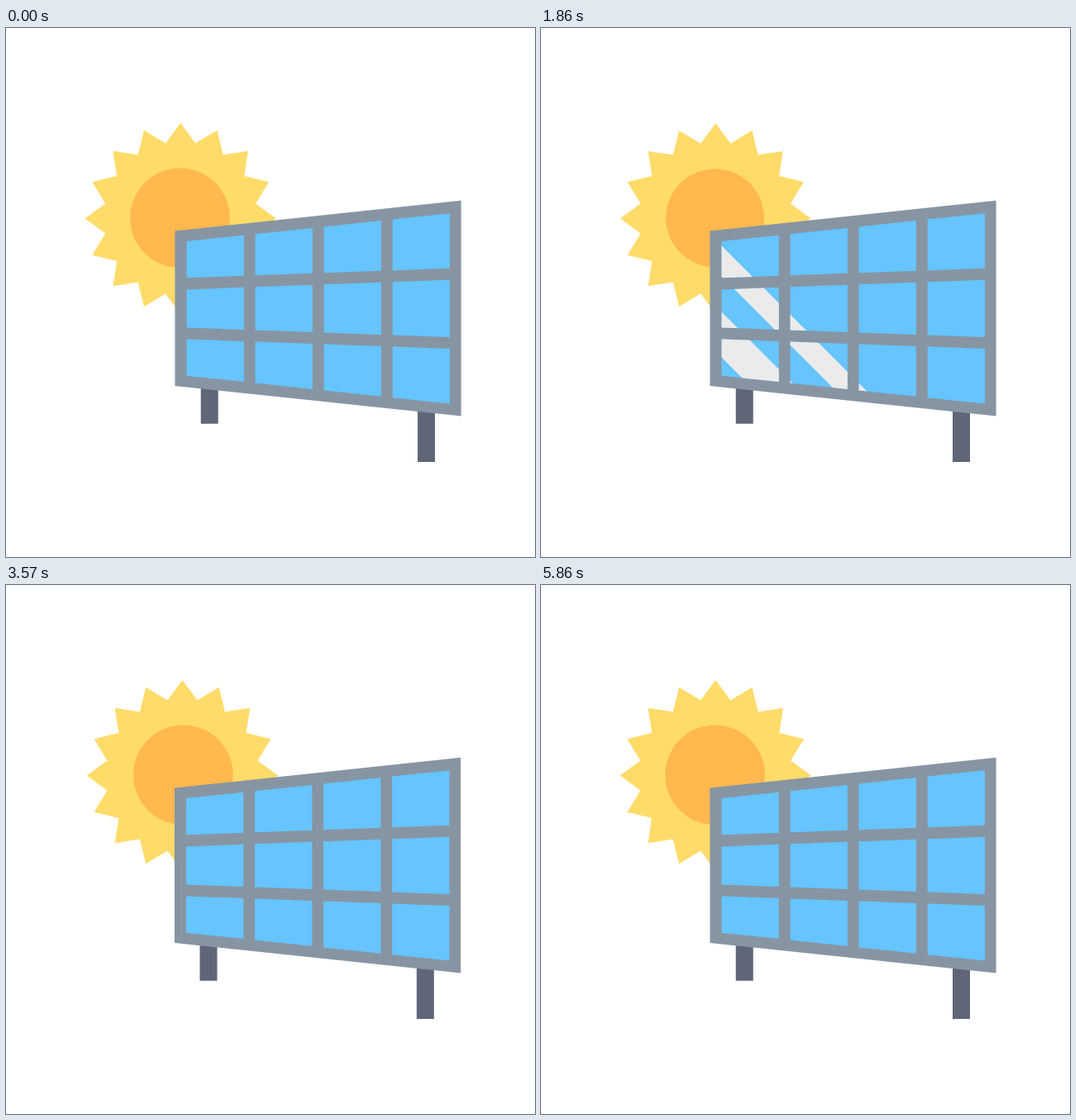
Write an HTML page that moves like this. It is 640x640 px and loops after 6 s.

```html
<!DOCTYPE html>
<html lang="en">
<head>
<meta charset="utf-8">
<title>Solar panel</title>
<style>
  html, body { margin: 0; width: 100%; height: 100%; overflow: hidden; background: #fff; }
  svg { display: block; width: 100%; height: 100%; }
</style>
</head>
<body>
<svg viewBox="0 0 640 640">
  <defs>
    <clipPath id="cellClip"><path id="window"/></clipPath>
  </defs>
  <path id="rays" fill="#ffdb69"/>
  <circle id="core" r="60.3" fill="#ffb84d"/>
  <path id="legs" fill="#5f6677" d="M235.7 400h21V478.7h-21ZM498 400h21V525h-21Z"/>
  <g id="panel">
    <path fill="#8795a3" d="M204.4 245.6L550.6 208.8V469.4L204.4 433Z"/>
    <path id="cells" fill="#66c4ff"/>
  </g>
  <g clip-path="url(#cellClip)">
    <path id="glare" fill="#ebebeb" d="M0 0h55l640 640h-55ZM98 0h37l640 640h-37Z"/>
  </g>
</svg>
<script>
const LOOP = 6000, STEPS = 84;
const $ = id => document.getElementById(id);

// Sixteen-pointed star around the origin
$('rays').setAttribute('d', 'M' + Array.from({ length: 32 }, (_, i) => {
  const r = i % 2 ? 92.7 : 115.6, a = i * Math.PI / 16;
  return `${r * Math.sin(a)} ${-r * Math.cos(a)}`;
}).join('L') + 'Z');

// Cell edges fan out symmetrically from the middle line, left to right
const LEFT = 218.5, CELL = 69.3, PITCH = 83.05, SPAN = 318.4, MIDDLE = 339.4;
const edge = (near, far) => x => near + (far - near) * (x - LEFT) / SPAN;
const outer = edge(81.3, 115.2), inner = edge(37.1, 48.7), mid = edge(23, 34.7);
const flip = f => x => -f(x);
let cellPath = '';
for (const [top, bottom] of [[flip(outer), flip(inner)], [flip(mid), mid], [inner, outer]]) {
  for (let col = 0; col < 4; col++) {
    const x = LEFT + col * PITCH, x2 = x + CELL;
    cellPath += `M${x} ${MIDDLE + top(x)}L${x2} ${MIDDLE + top(x2)}` +
                `V${MIDDLE + bottom(x2)}L${x} ${MIDDLE + bottom(x)}Z`;
  }
}
$('cells').setAttribute('d', cellPath);
$('window').setAttribute('d', cellPath);

// Sine ease from 0 to 1 over a span of time
const ease = (t, start, length) =>
  (1 - Math.cos(Math.PI * Math.min(1, Math.max(0, (t - start) / length)))) / 2;

// Eased move to a first offset, then a second, then back; each beat is longer by growth
function swing(t, start, beat, growth, first, second) {
  const beat2 = beat * growth, beat3 = beat2 * growth;
  return first * ease(t, start, beat) +
         (second - first) * ease(t, start + beat, beat2) -
         second * ease(t, start + beat + beat2, beat3);
}

const pulse = (t, beat, size) => 1 + swing(t, 0, beat, 1, size, -size);
const shake = (t, start, beat, growth, size) => swing(t, start, beat, growth, size, -size);
const flare = t => swing(t, 3700, 593, 1.2, -.127, .245);
const sweep = t => 320 - 660 * ease(t, t < 3000 ? 472 : 3456, 2060);

const place = (id, x, y, scale, turn = 0) =>
  $(id).setAttribute('transform', `translate(${x} ${y}) rotate(${turn}) scale(${scale})`);

// Scales about the middle of the panel
const placeAtPanel = (id, scale, dx) =>
  place(id, 377.7 * (1 - scale) + dx, 340 * (1 - scale), scale);

function draw(t) {
  const panelScale = pulse(t, 610, .1), panelX = shake(t, 2000, 482, 1.12, 26);
  placeAtPanel('panel', panelScale, panelX);
  placeAtPanel('window', panelScale, panelX);
  placeAtPanel('legs', panelScale, shake(t, 2000, 482, 1.14, 26));
  place('rays', 211.2 + shake(t, 2040, 525, 1.04, -26), 230.5,
        pulse(t, 640, .1) + flare(t), 360 * ease(t, 3758, 2102));
  place('core', 210.5 + shake(t, 2050, 525, 1.06, -26), 229.8,
        pulse(t, 660, .185) + flare(t));
  place('glare', sweep(t), 0, 1);
}

const start = performance.now();
function tick() {
  const t = (performance.now() - start) % LOOP;
  const step = Math.floor((t + 5) * STEPS / LOOP) % STEPS;
  draw(step * LOOP / STEPS);
  requestAnimationFrame(tick);
}
draw(0);
requestAnimationFrame(tick);
</script>
</body>
</html>
```
